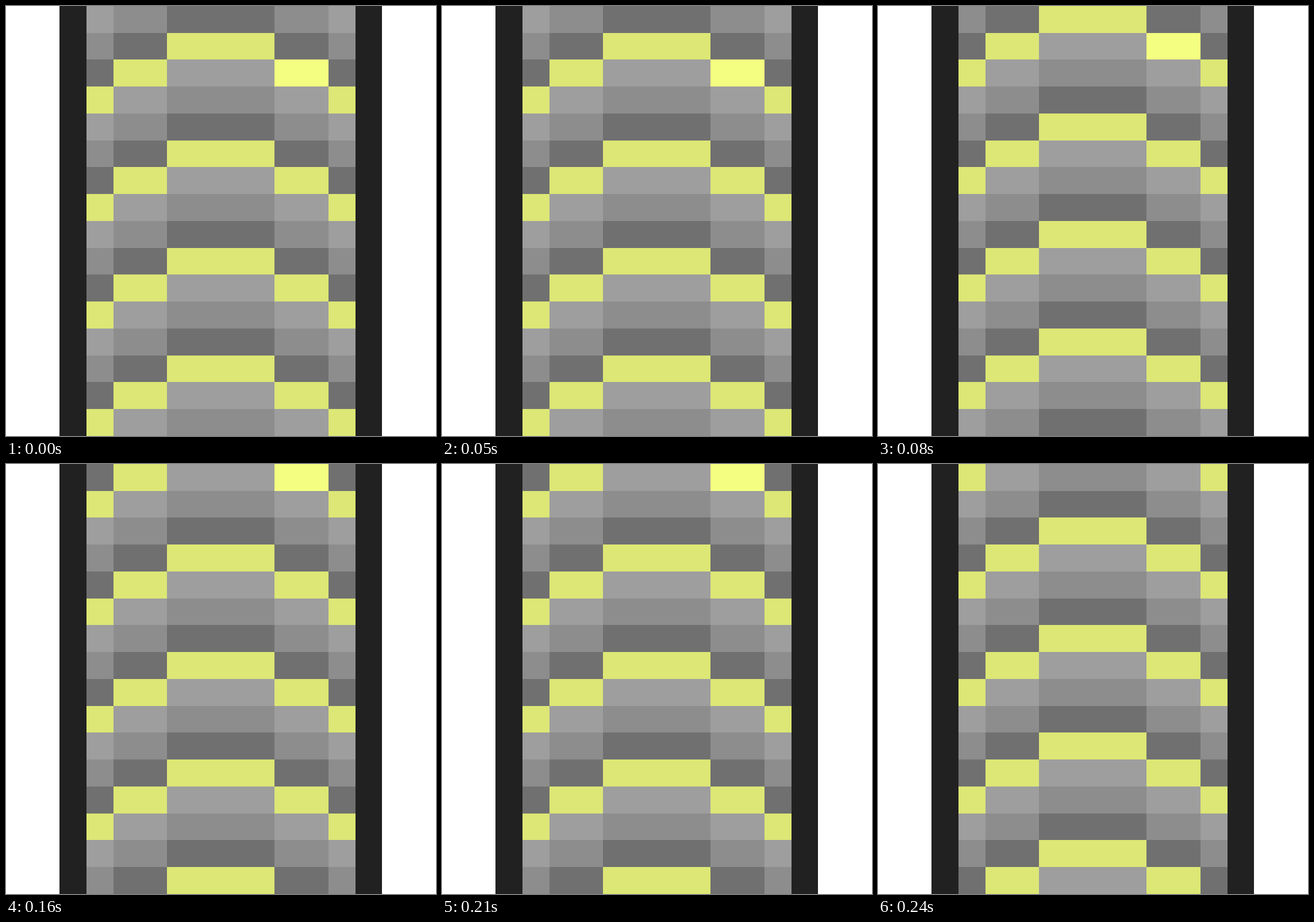
Animation, 748 px wide and 748 px high, one loop 320 ms. Source, as an HTML page with a canvas:

```html
<!DOCTYPE html>
<html lang="en">
<head>
<meta charset="utf-8">
<title>Conveyor</title>
<style>
  html, body { margin: 0; width: 100%; height: 100%; overflow: hidden; background: #fff; }
  canvas { display: block; width: 100vw; height: 100vh; }
</style>
</head>
<body>
<canvas id="stage" width="748" height="748"></canvas>
<script>
const ctx = document.getElementById('stage').getContext('2d');
const ROWS = 16;
const CELL = 748 / ROWS;
const STEP_MS = 80;
const STEPS = 4;

const RAIL = '#212121';
const GLINT = '#f4ff81';
const BANDS = ['#707070', '#dce775', '#9e9e9e', '#8d8d8d'];

// Each belt strip trails the middle one by `lag` rows, forming chevrons.
const STRIPS = [
  { col: 3, span: 1, lag: 2 },
  { col: 4, span: 2, lag: 1 },
  { col: 6, span: 4, lag: 0 },
  { col: 10, span: 2, lag: 1 },
  { col: 12, span: 1, lag: 2 },
];

// Snap grid lines to whole pixels.
const edge = n => Math.ceil(n * CELL - 0.5);

function block(col, row, w, h, color) {
  const x = edge(col), y = edge(row);
  ctx.fillStyle = color;
  ctx.fillRect(x, y, edge(col + w) - x, edge(row + h) - y);
}

function draw(step) {
  block(0, 0, ROWS, ROWS, '#fff');
  block(2, 0, 1, ROWS, RAIL);
  block(13, 0, 1, ROWS, RAIL);
  for (const { col, span, lag } of STRIPS) {
    for (let row = 0; row < ROWS; row++) {
      block(col, row, span, 1, BANDS[(row + step - lag + 4) % 4]);
    }
  }
  if (step < 3) block(10, 2 - step, 2, 1, GLINT);
}

const start = performance.now();

function tick(now) {
  draw(Math.floor(Math.max(0, now - start) / STEP_MS) % STEPS);
  requestAnimationFrame(tick);
}

draw(0);
requestAnimationFrame(tick);
</script>
</body>
</html>
```
